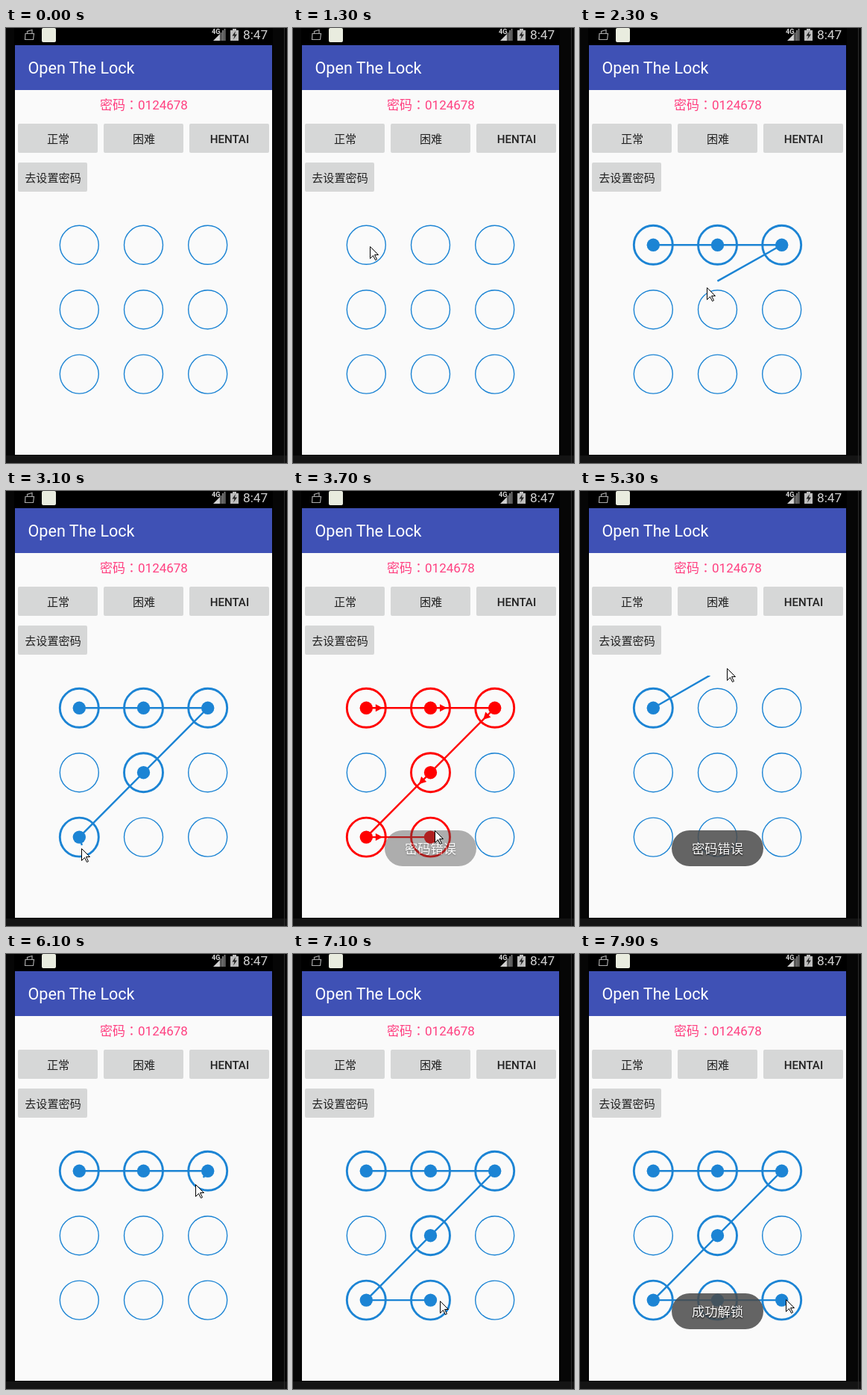
Animation, 377 px wide and 582 px high, one loop 8000 ms. Source, as an HTML page:

```html
<!DOCTYPE html>
<html lang="zh-CN">
<head>
<meta charset="utf-8">
<title>Open The Lock</title>
<style>
  html, body { margin: 0; width: 100%; height: 100%; overflow: hidden; background: #000; }
  svg { display: block; width: 377px; height: 582px; }
  text { font-family: Roboto, "Noto Sans CJK SC", "Noto Sans CJK", sans-serif; }
  .mid { text-anchor: middle; }
  .centered-colon { font-family: "Noto Sans CJK TC", "Noto Sans CJK", sans-serif; }
  .button rect { fill: #d6d7d7; }
  .button text { font-size: 15.1px; font-weight: 500; fill: #212121; }
  #toast text { font-size: 17.25px; font-weight: 500; fill: #fff; text-shadow: 0 1px 2px #000; }
</style>
</head>
<body>
<svg viewBox="0 0 377 582">
  <defs>
    <clipPath id="lockArea"><rect x="12" y="247" width="345" height="324"/></clipPath>
  </defs>

  <rect width="377" height="582" fill="#060606"/>
  <rect y="572" width="377" height="10" fill="#141414"/>
  <path d="M373.5 0V582" stroke="#2c2c2c"/>
  <rect x="11" width="347" height="572" fill="#000"/>
  <rect x="12" y="23" width="345" height="548" fill="#fafafa"/>
  <rect x="12" y="23" width="345" height="60" fill="#3f51b5"/>

  <g id="status">
    <path d="M26 7.5H37.5L36.5 15.5H25.5ZM28.5 7V4.5L35 2.5V7" fill="none" stroke="#a8a8a8" stroke-width="1.2"/>
    <rect x="48" y="0" width="19" height="19" rx="2" fill="#e9ecdf"/>
    <text x="276" y="8" font-size="9" font-weight="700" fill="#d8d8d8">4G</text>
    <path d="M278 17L287 8V17Z" fill="#d0d0d0"/>
    <path d="M288.5 17V6M291 17V3M293.500 17V1" stroke="#777" stroke-width="2"/>
    <path d="M301 3H304V1H309V3H312V17H301Z" fill="#bdbdbd"/>
    <path d="M308 4L303.500 10.500H306.500L305 15.500L310 8.500H307Z" fill="#222"/>
    <text x="318" y="15" font-size="17.25" fill="#d2d2d2">8:47</text>
  </g>

  <text x="29.500" y="60.500" font-size="21.6" fill="#fff">Open The Lock</text>
  <text class="mid" x="185" y="109" font-size="17" fill="#ff4081">密码<tspan class="centered-colon" lang="zh-TW">：</tspan>0124678</text>
  <g id="buttons"></g>
  <g id="lock" clip-path="url(#lockArea)"></g>

  <g id="toast">
    <rect x="123" y="454" width="123" height="48" rx="24" fill="#4b4b4b" fill-opacity=".85"/>
    <text class="mid" x="184.500" y="485"></text>
  </g>
  <path id="cursor" d="M.5 .5V16.5L4.5 12.5L7.5 18.5L9.5 17.5L6.5 11.5H11.5Z" fill="#fff" stroke="#000"/>
</svg>

<script>
const LOOP = 8000, STEP = 100, LAG = 45;
const BLUE = '#1c84d4', RED = '#ff0000';
const PASSWORD = '0124678', HIT_RADIUS = 26;
const byId = id => document.getElementById(id);
const lock = byId('lock'), toast = byId('toast'), cursor = byId('cursor');
const toastText = toast.querySelector('text');

const button = (x, y, w, label) =>
  `<g class="button"><rect x="${x}" y="${y}" width="${w}" height="39" rx="2"/>
   <text class="mid" x="${x + w / 2 + .5}" y="${y + 25.5}">${label}</text></g>`;

byId('buttons').innerHTML =
  ['正常', '困难', 'HENTAI'].map((label, i) => button(16 + 115 * i, 128, 107, label)).join('') +
  button(16, 180, 93, '去设置密码');

// Turning points of the pointer: time, x, y
const route = [
  [200, 366, 82], [1000, 121, 281], [1300, 103, 292],
  [1500, 103, 292], [2000, 266, 291], [2300, 170, 347], [2450, 172, 366],
  [2900, 105, 460], [3100, 101, 478], [3400, 185, 465], [4000, 195, 442],
  [4900, 96, 280], [5100, 96, 280], [5300, 197, 237], [6000, 278, 288],
  [6100, 254, 308], [6800, 79, 466], [7300, 276, 462]
];

const clamp = v => Math.max(0, Math.min(1, v));
const center = i => [98.3 + 86.2 * (i % 3), 290.3 + 86.4 * Math.floor(i / 3)];
const distance = (a, b) => Math.hypot(a[0] - b[0], a[1] - b[1]);

function pointer(t) {
  const next = Math.max(1, route.findIndex(p => p[0] > t));
  if (t >= route[route.length - 1][0]) return route[route.length - 1].slice(1);
  const [t0, x0, y0] = route[next - 1], [t1, x1, y1] = route[next];
  const k = clamp((t - t0) / (t1 - t0));
  return [x0 + (x1 - x0) * k, y0 + (y1 - y0) * k];
}

// Cells touched so far; a cell jumped over in a straight line is picked up too
function touchedCells(press, until) {
  const cells = [];
  const add = i => { if (!cells.includes(i)) cells.push(i); };
  for (let t = press; t <= until; t += STEP) {
    const touch = pointer(Math.max(press, t - LAG));
    for (let i = 0; i < 9; i++) {
      if (cells.includes(i) || distance(center(i), touch) > HIT_RADIUS) continue;
      if (cells.length) {
        const last = cells[cells.length - 1];
        const sameParity = (last % 3 - i % 3) % 2 === 0 &&
          (Math.floor(last / 3) - Math.floor(i / 3)) % 2 === 0;
        if (sameParity) add((last + i) / 2);
      }
      add(i);
    }
  }
  return cells;
}

const gestures = [[1500, 3600], [5100, 7600]].map(([press, release]) => {
  const correct = touchedCells(press, release).join('') === PASSWORD;
  return { press, release, correct, clear: correct ? LOOP : release + 1000 };
});

function arrow([x, y], to) {
  const angle = Math.atan2(to[1] - y, to[0] - x) * 180 / Math.PI;
  return `<path d="M22 0L12.5 -5V5Z" fill="${RED}" transform="translate(${x} ${y}) rotate(${angle})"/>`;
}

function drawLock(t) {
  const gesture = gestures.find(g => t >= g.press && t < g.clear);
  const cells = gesture ? touchedCells(gesture.press, Math.min(t, gesture.release)) : [];
  const released = gesture && t >= gesture.release;
  const wrong = released && !gesture.correct;
  const color = wrong ? RED : BLUE;
  const points = cells.map(center);
  let out = '';
  for (let i = 0; i < 9; i++) {
    const [x, y] = center(i), on = cells.includes(i);
    out += `<circle cx="${x}" cy="${y}" r="26" fill="none"
      stroke="${on ? color : BLUE}" stroke-width="${on ? 2.9 : 1.4}"/>`;
    if (on) out += `<circle cx="${x}" cy="${y}" r="8.7" fill="${color}"/>`;
  }
  const line = gesture && !released ? [...points, pointer(t - LAG)] : points;
  out += `<polyline points="${line.join(' ')}" fill="none" stroke="${color}" stroke-width="2.4"/>`;
  if (wrong) points.slice(1).forEach((p, i) => out += arrow(points[i], p));
  lock.innerHTML = out;
}

function drawToast(t) {
  const gesture = gestures.filter(g => t >= g.release).pop();
  const age = gesture ? t - gesture.release : 0;
  toast.setAttribute('opacity', gesture ? clamp((age + 80) / 350) * clamp((2300 - age) / 400) : 0);
  if (gesture) toastText.textContent = gesture.correct ? '成功解锁' : '密码错误';
}

function render(t) {
  const [x, y] = pointer(t).map(Math.round);
  cursor.setAttribute('transform', `translate(${x} ${y})`);
  cursor.setAttribute('visibility', t < route[0][0] ? 'hidden' : 'visible');
  drawLock(t);
  drawToast(t);
}

const start = performance.now();
let shown = -1;
function tick() {
  const t = Math.floor((performance.now() - start) % LOOP / STEP) * STEP;
  if (t !== shown) render(shown = t);
  requestAnimationFrame(tick);
}
tick();
</script>
</body>
</html>
```
